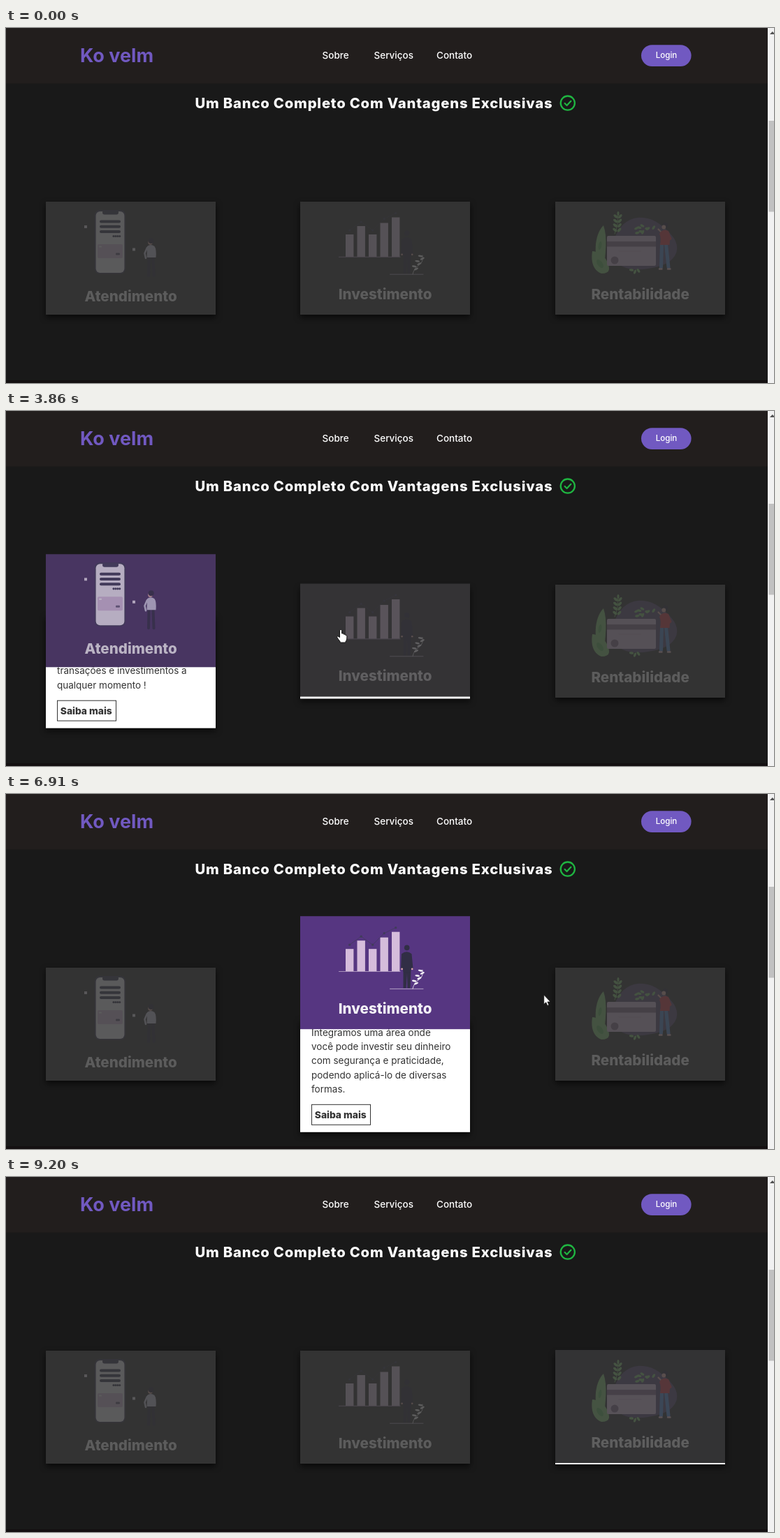
Animation, 1099 px wide and 509 px high, one loop 9270 ms. Source, as an HTML page:

```html
<!DOCTYPE html>
<html lang="pt-BR">
<head>
<meta charset="utf-8">
<title>Banco</title>
<style>
  html, body { margin: 0; width: 100%; height: 100%; overflow: hidden; background: #191919; }
  svg { display: block; width: 100%; height: 100%; font-family: Inter, "Open Sans", sans-serif; }
  .brand { font-size: 27px; font-weight: 700; fill: #7159c1; }
  .nav { font-size: 13.5px; font-weight: 500; fill: #fff; }
  .login { font-size: 11.6px; font-weight: 500; fill: #fff; text-anchor: middle; }
  .title { font-size: 20.25px; font-weight: 800; letter-spacing: .8px; fill: #fff; text-anchor: middle; }
  .head { font-size: 20.6px; font-weight: 800; fill: #fff; text-anchor: middle; }
  .body { font-size: 13.5px; fill: #333; }
  .label { font-size: 13.8px; font-weight: 800; }
  .panel { fill: #fff; filter: drop-shadow(0 4px 4px rgba(0, 0, 0, .65)); }
</style>
</head>
<body>
<svg id="stage" viewBox="0 0 1099 509" xmlns="http://www.w3.org/2000/svg"></svg>
<script>
const LOOP = 9270, FADE = 500, SHIFT = 81, TOP = 249, W = 243, H = 162;
const DARK = '#2f2e41', SLATE = '#3f3d56', PINK = '#dfc7e2', SKIN = '#e8b4ac';
const GREEN = '#65b860', LIGHT = '#8bcf78';

const repeat = (n, fn) => Array.from({ length: n }, (_, i) => fn(i)).join('');
const rect = (x, y, w, h, fill, r = 0) =>
  `<rect x="${x}" y="${y}" width="${w}" height="${h}" rx="${r}" fill="${fill}"/>`;
const dot = (x, y, r, fill) => `<circle cx="${x}" cy="${y}" r="${r}" fill="${fill}"/>`;
const shape = (d, fill) => `<path d="${d}" fill="${fill}"/>`;
const line = (d, color, w) =>
  `<path d="${d}" fill="none" stroke="${color}" stroke-width="${w}" stroke-linecap="round" stroke-linejoin="round"/>`;
const leaf = (x, y, angle, fill, rx = 3.2, ry = 1.6) =>
  `<ellipse rx="${rx}" ry="${ry}" fill="${fill}" transform="translate(${x} ${y}) rotate(${angle})"/>`;
const text = (cls, x, y, s) => `<text class="${cls}" x="${x}" y="${y}">${s}</text>`;

function seeded(seed) {
  return () => (seed = seed * 16807 % 2147483647) / 2147483647;
}

function phoneArt() {
  const bars = repeat(3, i => rect(77, 26.5 + i * 7.2, 30, 4, SLATE, 2));
  const bits = repeat(4, i => dot(97 + i * 2.9, 49.5, 1.6, SLATE));
  const tags = repeat(2, i => rect(55 + i * 69, 34 + i * 32.5, 4, 4, '#eee6f2'));
  const legs = line('M147.5 79L147 106M153.5 79L154.5 106', DARK, 4);
  return rect(70, 12, 44, 91.5, SLATE, 7) + rect(71.6, 14, 40.8, 88, '#f7f3f9', 6) +
    rect(81, 12.5, 23, 6, SLATE, 3) + bars + bits + tags +
    rect(74, 61, 36, 20, '#dcc5e1', 2) + rect(76, 63.5, 4, 2, '#fff', 1) + rect(100, 73.5, 6, 3, '#6d6480', 1) +
    legs + line('M145 66L141.5 74L143 81', '#d0cde1', 2.6) +
    shape('M145 64Q150 60 155.5 64Q158.5 68 157.5 80H144.5Z', '#d0cde1') +
    dot(149.5, 58.5, 3.2, SKIN) + dot(150.7, 56, 4, DARK);
}

function chartArt() {
  const tops = [47, 35, 47, 30.5, 22.5];
  const barX = i => 65 + i * 16.5;
  const trend = tops.map((y, i) => `${barX(i) + 5.7} ${y - 6}`).join('L');
  const plant = repeat(6, i =>
    leaf(174.5 - i * 2.2 + (i % 2 ? 2.5 : -2.5), 78 + i * 3.7, i % 2 ? -25 : 10, '#fff', 3.3, 1.3));
  return line('M' + trend, SLATE, .7) +
    tops.map((y, i) => rect(barX(i), y, 11.4, 79 - y, PINK) + dot(barX(i) + 5.7, y - 6, 1.6, SLATE)).join('') +
    line('M55.5 79.3H143', '#bda6cb', .9) + line('M128.5 104.2H176', '#d5c8df', .8) +
    shape('M147.5 76H158.5L157.5 103H153.5L153 82L151.5 103H147.5Z', DARK) +
    shape('M145 54Q152.5 48 159.5 54L161.5 75H158.5L158 80H147.5L147 75H144Z', DARK) +
    dot(145.6, 75.7, 1.3, SKIN) + dot(160.2, 75.7, 1.3, SKIN) + dot(152.7, 45.2, 3.8, DARK) +
    line('M161 104Q163 95 170 91Q177 86 175 77', '#fff', .8) + plant;
}

function cardArt() {
  const rnd = seeded(11);
  const blob = repeat(48, i => {
    const a = i * Math.PI / 24, wave = 1 + .07 * Math.sin(3 * a + .6);
    return `${i ? 'L' : 'M'}${(126 + 46 * wave * Math.cos(a)).toFixed(1)} ${(62 + 37 * wave * Math.sin(a)).toFixed(1)}`;
  }) + 'Z';
  const sprig = repeat(8, i =>
    leaf(i % 2 ? 93 - i * .2 : 86.5 - i * .2, 21 + (i >> 1) * 6.5, i % 2 ? -50 : 40, LIGHT, 3.6, 1.8));
  const loose = repeat(12, i => {
    const low = i > 8;
    return leaf(low ? 109 + (i - 9) * 5 : 116 + rnd() * 30, low ? 97 + rnd() * 5 : 31 + rnd() * 16,
      rnd() * 140 - 70, LIGHT, 3.2, 1.7);
  });
  return `<g opacity=".6">${shape(blob, '#8064a8')}</g>` +
    shape('M66 99C54 80 55 48 69 34C75 51 72 75 69 99Z', LIGHT) + leaf(64, 63, -80, GREEN, 6, 2.2) +
    shape('M66 103C53 98 51 84 53 71C66 72 77 84 77 97Q76 103 66 103Z', LIGHT) + leaf(64, 89, 55, GREEN, 7, 3.6) +
    line('M89.5 17Q91 32 85 46', LIGHT, .9) + leaf(90, 17, 90, LIGHT, 3, 1.5) + sprig +
    rect(74, 49, 70, 43, '#dec6e1', 2) + rect(74, 57, 70, 7.5, '#8f7595') +
    dot(85, 84, 5.5, '#8c7391') + line('M91 71H123', '#c5a9cb', .7) + loose +
    line('M152.5 61L151.5 94M158.5 61L162 94', '#5b92da', 5) +
    line('M149 96.5H152.5M161 96.5H164.5', '#eac0c4', 2.4) +
    line('M153 45L147.5 39.5', SKIN, 2.2) +
    shape('M151 43Q156 38.5 162 42Q165 46 163.5 62H150Q152 52 149 46Z', '#dc4450') +
    line('M161.5 45L165 53L158 58', '#dc4450', 3) +
    dot(157.3, 33.7, 4, DARK) + dot(155.3, 36.5, 2.9, SKIN);
}

// on / off: when the pointer enters and leaves the card
const cards = [
  { head: 'Atendimento', headY: 142.8, art: phoneArt, on: 1908, off: 3724,
    text: ['Sua conta 100% digital com', 'atendimento 24h por dia.', 'Faça seus pagamentos,',
      'transações e investimentos a', 'qualquer momento !'] },
  { head: 'Investimento', headY: 139.5, art: chartArt, on: 3845, off: 6863,
    text: ['Integramos uma área onde', 'você pode investir seu dinheiro', 'com segurança e praticidade,',
      'podendo aplicá-lo de diversas', 'formas.'] },
  { head: 'Rentabilidade', headY: 139.5, art: cardArt, on: 6950, off: 8773,
    text: ['Nossas poupanças rendem', 'muito além do que você pode', 'imaginar, com taxas que irão',
      'valorizar muito mais o seu', 'dinheiro !'] }
];

// key points of the pointer tip: time, x, y
const path = [
  [500, 1095, 512], [660, 1068, 501], [1000, 700, 540], [1370, 292, 503], [1750, 252, 540],
  [1908, 251, 411], [2270, 248, 373], [2700, 248, 308], [3520, 250, 306], [3860, 479, 313],
  [4750, 520, 322], [5050, 602, 330], [5720, 491, 464], [5980, 500, 463], [6300, 540, 345],
  [6700, 545, 335], [6910, 769.5, 288], [7520, 904, 294], [8190, 904, 294], [8773, 985, 470]
];

const cardMarkup = (c, i) => {
  c.x = Math.floor(57 + i * 364.5);
  return `<g class="card" transform="translate(${c.x} ${TOP})">
    <g class="low"><rect class="panel" width="${W}" height="${H}"/>
      ${c.text.map((s, n) => text('body', 16, 24 + n * 20.25, s)).join('')}
      <rect class="btn" x="16.5" y="122.5" width="84" height="29" stroke="#333"/>
      ${text('label', 20.8, 142, 'Saiba mais')}</g>
    <g class="face"><rect class="cover" width="${W}" height="${H}"/>
      <g class="content">${c.art()}${text('head', 121.6, c.headY, c.head)}</g></g>
  </g>`;
};

const stage = document.getElementById('stage');
stage.innerHTML = rect(0, 0, 1099, 509, '#191919') + rect(0, 0, 1090, 79.5, '#221e1d') +
  rect(0, 505, 1090, 4, '#141011') +
  text('brand', 106, 49, 'Ko velm') + text('nav', 452.5, 44, 'Sobre') +
  text('nav', 526.5, 44, 'Serviços') + text('nav', 616, 44, 'Contato') +
  rect(909, 24.2, 71.6, 30.8, '#7159c1', 15.4) + text('login', 945, 43.3, 'Login') +
  text('title', 526.4, 114.8, 'Um Banco Completo Com Vantagens Exclusivas') +
  `<circle cx="803.8" cy="107.6" r="10.1" fill="none" stroke="#1fb541" stroke-width="2.3"/>` +
  line('M799.6 108L802.6 111L808.4 104.8', '#1fb541', 2.2) +
  cards.map(cardMarkup).join('') +
  rect(1090, 0, 9, 509, '#f1f1f1') + rect(1091.5, 133, 7.5, 130.5, '#c1c1c1') +
  shape('M1093 9L1096.8 5L1099 7.3V9Z', '#505050') +
  `<g id="cursor" fill="#fff" stroke="#111" stroke-linejoin="round">
    <path id="arrow" stroke-width=".8" d="M0 0V13.5L3 10.8L5 15.4L7.2 14.4L5.2 10H9.4Z"/>
    <path id="hand" d="M-1.6 1.4Q0 -.8 1.6 1.4V6Q4 5 4.4 7.2Q6.2 6.4 6.6 8.2Q8.6 7.8 8.8 9.8V13Q8.5 16 7 17.5V19H-1V17.5Q-4 14 -5.6 11Q-5 8.6 -1.6 11.6Z"/>
  </g>`;

const [cursor, arrow, hand] = ['cursor', 'arrow', 'hand'].map(id => document.getElementById(id));
document.querySelectorAll('.card').forEach((el, i) => {
  for (const k of ['low', 'btn', 'label', 'face', 'cover', 'content']) cards[i][k] = el.querySelector('.' + k);
});

// CSS "ease": cubic-bezier(.25, .1, .25, 1)
function ease(p) {
  if (p <= 0) return 0;
  if (p >= 1) return 1;
  let lo = 0, hi = 1, s;
  for (let i = 0; i < 24; i++) {
    s = (lo + hi) / 2;
    if (.75 * s * (1 - s) + s ** 3 < p) lo = s; else hi = s;
  }
  return .3 * s * (1 - s) ** 2 + 3 * s * s * (1 - s) + s ** 3;
}

const blend = (a, b, k) => a + (b - a) * k;
const mix = (a, b, k) => `rgb(${a.map((v, i) => Math.round(blend(v, b[i], k)))})`;

function pointer(t) {
  const i = path.findIndex(p => p[0] > t);
  if (i < 1) return path.at(i).slice(1);
  const [t0, x0, y0] = path[i - 1], [t1, x1, y1] = path[i], k = (t - t0) / (t1 - t0);
  return [blend(x0, x1, k), blend(y0, y1, k)];
}

function draw(t) {
  const [px, py] = pointer(t);
  let over = false;
  for (const c of cards) {
    const k = ease((t - c.on) / FADE) - ease((t - c.off) / FADE);
    const inside = t >= c.on && t < c.off;
    const bx = px - c.x, by = py - TOP - SHIFT * k;
    const hot = inside && bx > 16 && bx < 101 && by > 122 && by < 152;
    over = over || inside;
    c.low.setAttribute('transform', `translate(0 ${SHIFT * k})`);
    c.face.setAttribute('transform', `translate(0 ${-SHIFT * k})`);
    c.cover.setAttribute('fill', mix([51, 51, 51], [89, 54, 137], k));
    c.content.setAttribute('opacity', blend(.2, 1, k));
    c.btn.setAttribute('fill', hot ? '#333' : '#fff');
    c.label.setAttribute('fill', hot ? '#fff' : '#333');
  }
  cursor.setAttribute('transform', `translate(${px} ${py})`);
  cursor.setAttribute('display', t > path[0][0] && t < path.at(-1)[0] ? 'inline' : 'none');
  hand.setAttribute('display', over ? 'inline' : 'none');
  arrow.setAttribute('display', over ? 'none' : 'inline');
}

const start = performance.now();
function tick() {
  draw((performance.now() - start) % LOOP);
  requestAnimationFrame(tick);
}
tick();
</script>
</body>
</html>
```
